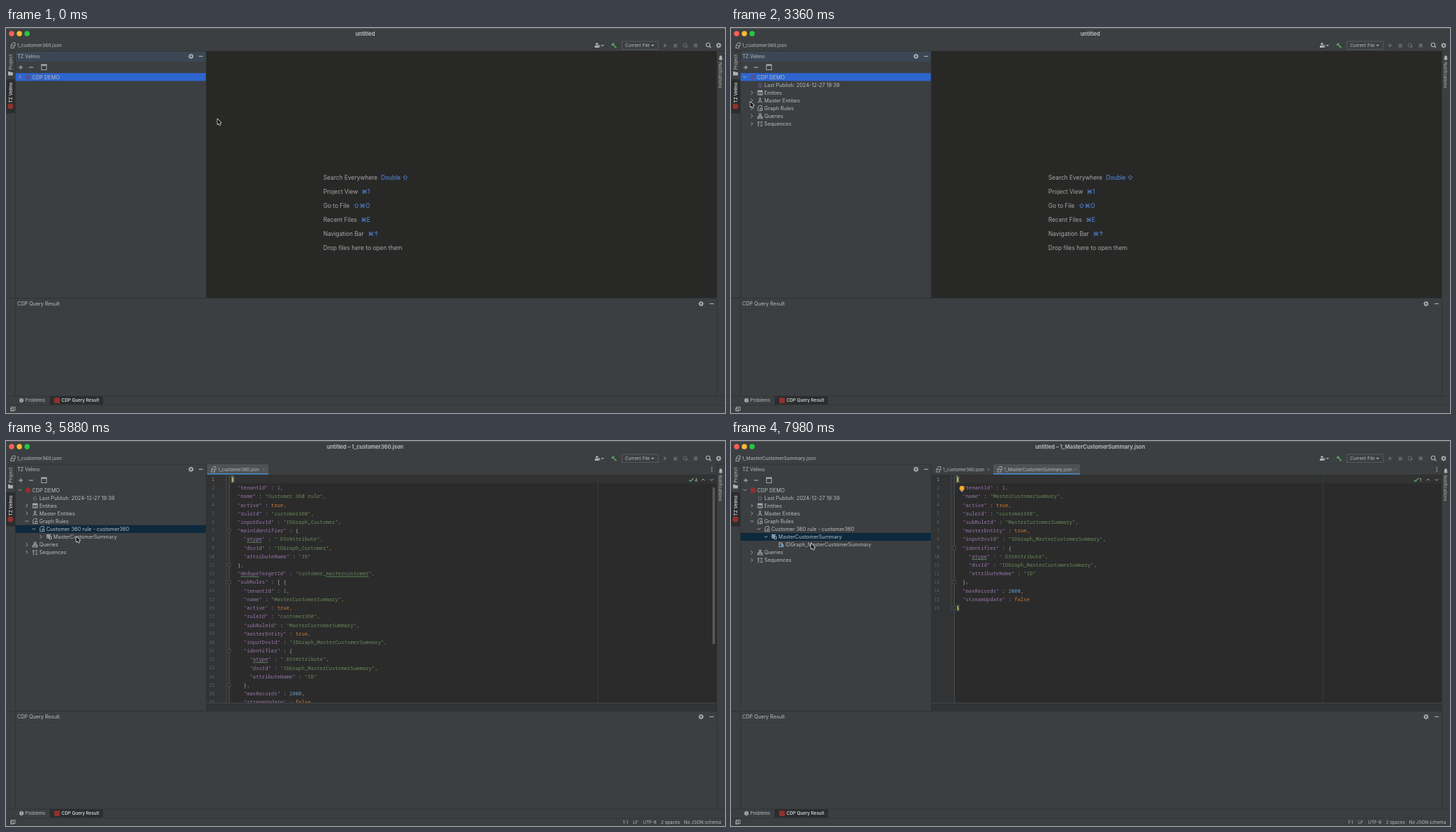
Recreate the animation shown at these times as an HTML page with a canvas. Size 1022 px wide and 548 px high, loop 8 s.

```html
<!DOCTYPE html>
<html lang="en">
<head>
<meta charset="utf-8">
<title>Editor demo</title>
<style>
html, body { margin: 0; width: 1022px; height: 548px; overflow: hidden; background: #3c3f41; }
canvas { display: block; }
</style>
</head>
<body>
<canvas id="stage" width="1022" height="548"></canvas>
<script>
const c = document.getElementById('stage').getContext('2d');
const LOOP = 8000, STEP = 70, TAU = Math.PI * 2;
const UI = 'Inter, Roboto, sans-serif', MONO = '"Noto Sans Mono", "DejaVu Sans Mono", monospace';
const GREY = '#bbbdbe', ICON = '#afb1b3', DIM = '#606365', RED = '#94302c', EDGE = '#313335';
const APP = 'TZ Velmo';

// When things happen, in ms
const EXPAND = 2450, RULES = 3850, PICK = 4620, OPEN1 = 4760, READY1 = 5460,
  PICK2 = 6580, OPEN2 = 6720, READY2 = 7280, BULB = 7700;
const CLICKS = [[2380, 21, 70.5], [3780, 30, 115], [4690, 93, 125.5], [6650, 101, 137.5]];
const LOADS = [EXPAND, RULES, OPEN1, OPEN2];
const PATH = [[0, 300.5, 129.5], [630, 300.5, 129.5], [840, 57, 72], [1050, 57, 72], [1540, 20, 68.5],
  [2800, 20, 68.5], [3570, 29, 113], [3850, 29, 113], [4130, 50.5, 120], [4480, 92.5, 123],
  [5250, 92.5, 123], [5740, 100, 136], [7210, 100, 136], [7770, 114, 146], [LOOP, 114, 146]];

const DOC1 = `{
  "tenantId" : 1,
  "name" : "Customer 360 rule",
  "active" : true,
  "ruleId" : "customer360",
  "inputDsvId" : "IDGraph_Customer",
  "mainIdentifier" : {
    "atype" : ".DSVAttribute",
    "dsvId" : "IDGraph_Customer",
    "attributeName" : "ID"
  },
  "dedupeTargetId" : "customer_mastercustomer",
  "subRules" : [ {
    "tenantId" : 1,
    "name" : "MasterCustomerSummary",
    "active" : true,
    "ruleId" : "customer360",
    "subRuleId" : "MasterCustomerSummary",
    "masterEntity" : true,
    "inputDsvId" : "IDGraph_MasterCustomerSummary",
    "identifier" : {
      "atype" : ".DSVAttribute",
      "dsvId" : "IDGraph_MasterCustomerSummary",
      "attributeName" : "ID"
    },
    "maxRecords" : 2000,
    "streamUpdate" : false
  } ]`.split('\n');
const DOC2 = [DOC1[0], ...DOC1.slice(13, 27).map(s => s.slice(2)), '}'];

function rect(x, y, w, h, color) { c.fillStyle = color; c.fillRect(x, y, w, h); }
function dot(x, y, r, color) {
  c.fillStyle = color;
  c.beginPath(); c.arc(x, y, r, 0, TAU); c.fill();
}
function ring(x, y, r, color = ICON, w = 1) {
  c.strokeStyle = color; c.lineWidth = w;
  c.beginPath(); c.arc(x, y, r, 0, TAU); c.stroke();
}
function box(x, y, w, h, color = ICON, lw = 0.9) {
  c.strokeStyle = color; c.lineWidth = lw; c.strokeRect(x, y, w, h);
}
function trace(points) {
  c.beginPath();
  for (let i = 0; i < points.length; i += 2) c.lineTo(points[i], points[i + 1]);
}
function line(points, color = ICON, w = 1) {
  trace(points); c.strokeStyle = color; c.lineWidth = w; c.stroke();
}
function poly(points, color) { trace(points); c.fillStyle = color; c.fill(); }
function text(s, x, y, size = 7.15, color = GREY, weight = 400, align = 'left', family = UI) {
  c.font = `${weight} ${size}px ${family}`;
  c.textAlign = align; c.fillStyle = color;
  c.fillText(s, x, y + size * 0.36);
}
function turned(s, x, y, angle, size, color, weight) {
  c.save(); c.translate(x, y); c.rotate(angle);
  text(s, 0, 0, size, color, weight, 'center');
  c.restore();
}
function chevron(x, y, open, color = ICON) {
  line(open ? [x - 2.3, y - 1.2, x, y + 1.2, x + 2.3, y - 1.2] : [x - 1.2, y - 2.4, x + 1.2, y, x - 1.2, y + 2.4], color, 0.9);
}
function gear(x, y) {
  ring(x, y, 2.1, ICON, 1.5);
  for (let a = 0; a < 8; a++) {
    const u = Math.cos(a * TAU / 8), v = Math.sin(a * TAU / 8);
    line([x + u * 2.4, y + v * 2.4, x + u * 3.7, y + v * 3.7], ICON, 1.2);
  }
}
function minus(x, y) { line([x - 3, y, x + 3, y], ICON, 1.1); }
function fileIcon(x, y) {
  line([x + 3, y + 1, x + 3, y - 4, x, y - 4, x - 2, y - 2, x - 2, y], ICON, 0.9);
  box(x - 3, y, 4.5, 3.5, '#9a9da0', 1);
}

const ICONS = {
  app(x, y) { dot(x, y, 3.6, RED); },
  braces(x, y) { text('{}', x, y, 7, '#a583c0', 400, 'center'); },
  table(x, y) {
    box(x - 3.2, y - 3, 6.5, 6); rect(x - 3.2, y - 3, 6.5, 2, ICON);
    line([x - 1, y - 3, x - 1, y + 3, x + 1.2, y + 3, x + 1.2, y - 3], ICON, 0.7);
  },
  master(x, y) {
    ring(x, y - 2.4, 1.2);
    line([x - 3, y + 3.5, x, y - 1, x + 3, y + 3.5], ICON, 0.9);
    line([x - 1.6, y + 1.5, x + 1.6, y + 1.5], ICON, 0.8);
  },
  rule(x, y) {
    line([x - 1, y + 3.5, x - 3, y + 3.5, x - 3, y - 2, x - 1, y - 3.8, x + 2.5, y - 3.8, x + 2.5, y - 1], ICON, 0.9);
    box(x, y, 3, 3.3);
  },
  nodes(x, y) {
    box(x - 1.3, y - 3.4, 2.6, 2.4);
    box(x - 3.4, y + 1, 2.4, 2.4); box(x + 1, y + 1, 2.4, 2.4);
    line([x - 2.2, y + 1, x - 2.2, y, x + 2.2, y, x + 2.2, y + 1], ICON, 0.7);
  },
  sequence(x, y) {
    line([x - 2.3, y - 3.5, x - 2.3, y + 3.5], ICON, 1);
    line([x - 3.6, y - 1.8, x - 2.3, y - 3.5, x - 1, y - 1.8], ICON, 0.8);
    for (const d of [-2.6, 0, 2.6]) rect(x + 0.4, y + d - 0.6, 3, 1.2, d ? ICON : '#4a88c7');
  },
  sub(x, y) {
    rect(x - 3.7, y - 3, 5, 5, '#7c98ad'); box(x, y - 0.5, 3.2, 3.5, ICON);
    line([x - 3.7, y - 3.2, x + 3, y - 3.2], ICON, 1);
  },
  data(x, y) {
    box(x - 3, y - 3, 4.5, 6); rect(x, y - 0.5, 3.5, 3.8, '#6e9fc4');
    line([x - 3, y - 1, x + 1.5, y - 1], ICON, 0.8);
  }
};

function frame() {
  rect(0, 0, 1022, 548, '#3c3f41');
  rect(0, 0, 1022, 1, '#55585a');
  rect(13, 33, 1, 491, EDGE);
  rect(0, 32.5, 1022, 1, EDGE);
  rect(284, 33, 1, 351, EDGE);
  rect(0, 384, 1010, 1, '#2f3133');
  rect(13, 400, 997, 0.7, '#37393b');
  rect(1010, 33, 1, 491, EDGE);
  rect(0, 523.5, 1022, 0.8, EDGE);
  rect(0, 536.3, 1022, 0.8, EDGE);
  ['#ff5f57', '#febc2e', '#28c840'].forEach((color, i) => dot(8 + i * 11, 8, 3.7, color));

  // Toolbar on the right
  dot(840, 22.8, 1.7, ICON); rect(837, 25, 6, 3, ICON); rect(842, 24, 2.5, 3.5, '#8d9092');
  poly([846, 24, 850, 24, 848, 26.2], ICON);
  line([861, 24.5, 864, 21.8], '#57a55b', 2.3); line([863, 23.5, 867.5, 28.3], '#57a55b', 1.7);
  box(875.5, 19, 51.5, 11.7, '#5e6163', 0.8);
  text('Current File', 880, 25, 6.35);
  poly([917, 23.7, 921.4, 23.7, 919.2, 26.3], ICON);
  poly([935, 21.7, 940, 24.8, 935, 28], DIM);
  dot(951.5, 25.2, 2.7, DIM); line([948.5, 22, 954.5, 28.3], DIM, 0.7); line([954.5, 22, 948.5, 28.3], DIM, 0.7);
  ring(965, 24.5, 2.5, DIM, 1.2); poly([966, 24, 970, 26.2, 966, 28.5], DIM);
  rect(977.7, 22.2, 5.3, 5.3, DIM);
  ring(998, 24, 2.7, ICON, 1.1); line([1000, 26, 1002.3, 28.4], ICON, 1.3);
  gear(1013, 24.7);

  // Side strips
  turned('Project', 6.3, 48.5, -TAU / 4, 6.5, GREY);
  rect(3, 63, 6.8, 4.5, ICON); rect(3, 62, 3, 1.2, ICON);
  rect(0, 73, 13, 48.5, '#2b2d2e');
  turned(APP, 6.3, 92, -TAU / 4, 6.4, '#e2e3e4', 500);
  dot(6.3, 111.5, 4, RED);
  poly([1012.8, 45, 1014, 43.5, 1014, 41.2, 1017.8, 41.2, 1017.8, 43.5, 1019, 45], ICON);
  dot(1015.9, 41.2, 1.9, ICON); rect(1015, 45.5, 1.8, 1, ICON);
  turned('Notifications', 1015.7, 67.2, TAU / 4, 6.2, GREY);

  // Lower panel
  text('CDP Query Result', 16, 392.5);
  gear(988, 392.5); minus(1003, 392.5);
  dot(22, 530, 2.9, ICON); rect(21.6, 528.3, 0.9, 2.2, '#3c3f41'); rect(21.6, 531, 0.9, 0.9, '#3c3f41');
  text('Problems', 27.3, 530, 6.4);
  rect(62, 524, 76, 12, '#2b2d2e');
  rect(68.5, 526.3, 8, 7.6, RED);
  text('CDP Query Result', 79, 530, 6.25, '#e2e3e4', 500);
  box(7.6, 539.5, 5.4, 5, ICON, 0.8); box(6.8, 541.3, 4, 3.8, ICON, 0.8);
}

function treeRows(t) {
  const rows = [[0, 'CDP DEMO', 'app', t >= EXPAND]];
  if (t < EXPAND) return rows;
  rows.push([1, 'Last Publish: 2024-12-27 19:39', 'braces'], [1, 'Entities', 'table', false],
    [1, 'Master Entities', 'master', false], [1, 'Graph Rules', 'rule', t >= RULES]);
  if (t >= RULES) rows.push([2, 'Customer 360 rule - customer360', 'rule', t >= OPEN1]);
  if (t >= OPEN1) rows.push([3, 'MasterCustomerSummary', 'sub', t >= OPEN2]);
  if (t >= OPEN2) rows.push([4, 'IDGraph_MasterCustomerSummary', 'data']);
  rows.push([1, 'Queries', 'nodes', false], [1, 'Sequences', 'sequence', false]);
  return rows;
}

function sidePanel(t) {
  if (t < OPEN1) rect(14, 33.5, 270, 14.5, '#3b4754');
  text(APP, 16, 40.5);
  gear(263, 40.3); minus(277, 40.3);
  line([18, 56, 24, 56], ICON, 1.1); line([21, 53, 21, 59], ICON, 1.1);
  minus(35.7, 56);
  box(50.3, 52, 7.4, 7.5, ICON, 0.9); rect(50.3, 52, 7.4, 1.8, ICON);

  const selected = t < PICK ? 0 : t < PICK2 ? 5 : 6;
  const rowY = i => 69.9 + 11.1 * i;
  rect(13.5, rowY(selected) - 5.7, 270.5, 11.1, t < OPEN1 ? '#2d65cf' : '#0d293e');
  treeRows(t).forEach(([depth, label, icon, open], i) => {
    const x = 10 * depth, y = rowY(i);
    if (open !== undefined) chevron(x + 19.6, y - 0.2, open);
    c.globalAlpha = i === 0 && selected === 0 ? 0.35 : 1;
    ICONS[icon](x + 31.3, y);
    c.globalAlpha = 1;
    text(label, x + 37.2, y, 7.3);
  });

  for (const start of LOADS) {
    const age = t - start;
    if (age < 0 || age > 420) continue;
    c.globalAlpha = age < 240 ? 1 : (420 - age) / 180;
    for (let i = 0; i < 10; i++) {
      const a = i * TAU / 10, u = Math.cos(a), v = Math.sin(a);
      const shade = 95 + 7 * ((i - Math.floor(t / STEP) + 200) % 10);
      line([148 + u * 4, 218 + v * 4, 148 + u * 7.6, 218 + v * 7.6], `rgb(${shade},${shade},${shade})`, 1.2);
    }
    text('Loading...', 148, 235, 7.3, '#97999a', 400, 'center');
    c.globalAlpha = 1;
  }
}

function welcome() {
  rect(285, 33, 725, 351, '#282827');
  [['Search Everywhere', 'Double ⇧', 533], ['Project View', '⌘1', 505.5], ['Go to File', '⇧⌘O', 494],
    ['Recent Files', '⌘E', 504.5], ['Navigation Bar', '⌘↑', 514.5], ['Drop files here to open them', '', 0]]
    .forEach(([label, keys, x], i) => {
      text(label, 451, 212.5 + 20 * i, 8.35, '#a6a7a8');
      text(keys, x, 212.5 + 20 * i, 8.35, '#538fe8');
    });
}

function tab(name, x, w, active, icon) {
  if (active) { rect(x, 33, w, 15, '#4e5254'); rect(x, 46, w, 2, '#4a88c7'); }
  if (icon) fileIcon(x + 9, 40.5);
  text(name, x + 15.2, 40.5, 6.25);
  const r = x + w - 7;
  line([r - 1.5, 39, r + 1.5, 42], '#7e8183', 0.7); line([r + 1.5, 39, r - 1.5, 42], '#7e8183', 0.7);
}

const SIZE = 7.22, CELL = SIZE * 0.6, CODE_X = 320.5;
const lineY = n => 54.3 + 12.215 * n;

function codeLine(s, n) {
  const y = lineY(n), at = i => CODE_X + i * CELL;
  for (const m of s.matchAll(/"[^"]*"(?= :)|"[^"]*"|true|false|\d+|,|[^\s]/g)) {
    const k = m[0], end = m.index + k.length;
    const color = k[0] === '"' ? (s.startsWith(' :', end) ? '#9876aa' : '#6a8759')
      : /^\d/.test(k) ? '#6897bb' : /^(true|false|,)$/.test(k) ? '#cc7832' : '#a9b7c6';
    text(k, at(m.index), y, SIZE, color, 500, 'left', MONO);
  }
  for (const m of s.matchAll(/atype|dedupe|mastercustomer/g)) {
    line([at(m.index), y + 4.4, at(m.index + m[0].length), y + 4.4], '#5f9164', 0.9);
  }
}

function brace(s, n) {
  rect(CODE_X, lineY(n) - 5, CELL, 10, '#3b514d');
  text(s, CODE_X, lineY(n), SIZE, '#ffef28', 700, 'left', MONO);
}

function editor(t) {
  const second = t >= OPEN2, ready = second ? t >= READY2 : t >= READY1;
  const doc = second ? DOC2 : DOC1, bottom = ready ? 373 : 384;
  rect(285, 33, 725, 351, '#3c3f41');
  rect(285, 48, 725, 336, '#2b2b2b');
  rect(285, 48, 32, bottom - 48, '#313335');
  rect(285, 48.3, 725, 12, '#323232');
  rect(317, 48, 0.8, bottom - 48, '#55585a');
  rect(841, 48, 0.8, bottom - 48, '#3d3f40');
  tab('1_customer360.json', 286, 87, !second, t >= READY1);
  if (second) tab('1_MasterCustomerSummary.json', 373, 123, true, ready);
  rect(285, 47.7, 725, 0.6, EDGE);
  for (const d of [-2.6, 0, 2.6]) dot(1003.3, 40.3 + d, 0.8, ICON);

  c.save();
  c.beginPath(); c.rect(285, 48, 725, bottom - 48); c.clip();
  doc.forEach((s, n) => {
    text(n + 1, 296.2, lineY(n), 6.3, n ? '#606366' : '#a4a3a3', 400, 'right', MONO);
    codeLine(s, n);
  });
  if (ready) {
    rect(312.5, 48, 0.8, second ? lineY(15) - 42 : bottom - 48, '#4a4d4f');
    for (const n of second ? [8, 12, 15] : [6, 10, 12, 20, 24]) {
      rect(315.2, lineY(n) - 2.3, 4.4, 4.6, '#2b2b2b');
      box(315.2, lineY(n) - 2.3, 4.4, 4.6, '#55585a', 0.6);
    }
    brace('{', 0);
    if (second) brace('}', 15);
    line([971, 55.5, 973, 57.5, 977.5, 52.8], '#5fa565', 1.3);
    text(second ? 1 : 4, 978.8, 55.2, 6.8);
    line([988.7, 56.3, 991, 54, 993.3, 56.3], ICON, 0.9);
    chevron(1003, 55.2, true);
  }
  rect(320.8, 49, 0.9, 10.5, '#bbbbbb');
  if (!second) rect(1004.3, ready ? 66 : 49, 3.4, ready ? 223 : 262, '#595b5c');
  if (t >= BULB) {
    dot(328.2, 67.3, 3.5, '#f2ab26');
    rect(326.8, 70.5, 2.8, 1.8, '#a9abad');
  }
  c.restore();
  if (ready) {
    rect(285, 373, 725, 11, EDGE);
    rect(285, 372.6, 725, 0.8, '#4b4e50');
  }

  if (t >= READY1) {
    [['1:1', 877], ['LF', 891.3], ['UTF-8', 905.5], ['2 spaces', 931], ['No JSON schema', 963.8]]
      .forEach(([s, x]) => text(s, x, 542.3, 6.3));
  }
}

function pointer(t) {
  for (const [start, x, y] of CLICKS) {
    const age = t - start;
    if (age < 0 || age > 420) continue;
    c.globalAlpha = 0.82 * Math.min(1, (420 - age) / 170);
    dot(x, y, 8.7, '#1f66c4');
    c.globalAlpha = 1;
  }
  const i = PATH.findIndex(p => p[0] > t);
  const [t0, x0, y0] = PATH[i - 1], [t1, x1, y1] = PATH[i];
  const p = (t - t0) / (t1 - t0), e = p * p * (3 - 2 * p);
  c.save();
  c.translate(x0 + (x1 - x0) * e, y0 + (y1 - y0) * e);
  trace([0, 0, 0, 7.6, 1.8, 6, 3, 8.8, 4.4, 8.2, 3.2, 5.5, 5.5, 5.4]);
  c.closePath();
  c.lineJoin = 'round';
  c.strokeStyle = '#e8e8e8'; c.lineWidth = 1.4; c.stroke();
  c.fillStyle = '#111'; c.fill();
  c.restore();
}

function draw(now) {
  const t = Math.floor(now % LOOP / STEP) * STEP;
  const name = t >= OPEN2 ? '1_MasterCustomerSummary.json' : '1_customer360.json';
  frame();
  text(t < OPEN1 ? 'untitled' : `untitled – ${name}`, 510.5, 8.3, 7.55, '#c3c4c5', 600, 'center');
  fileIcon(10, 25);
  text(t >= READY2 ? name : '1_customer360.json', 15.5, 25, 6.8);
  sidePanel(t);
  if (t < OPEN1) welcome(); else editor(t);
  pointer(t);
}

const begin = performance.now();
function tick() {
  draw(performance.now() - begin);
  requestAnimationFrame(tick);
}
tick();
</script>
</body>
</html>
```
